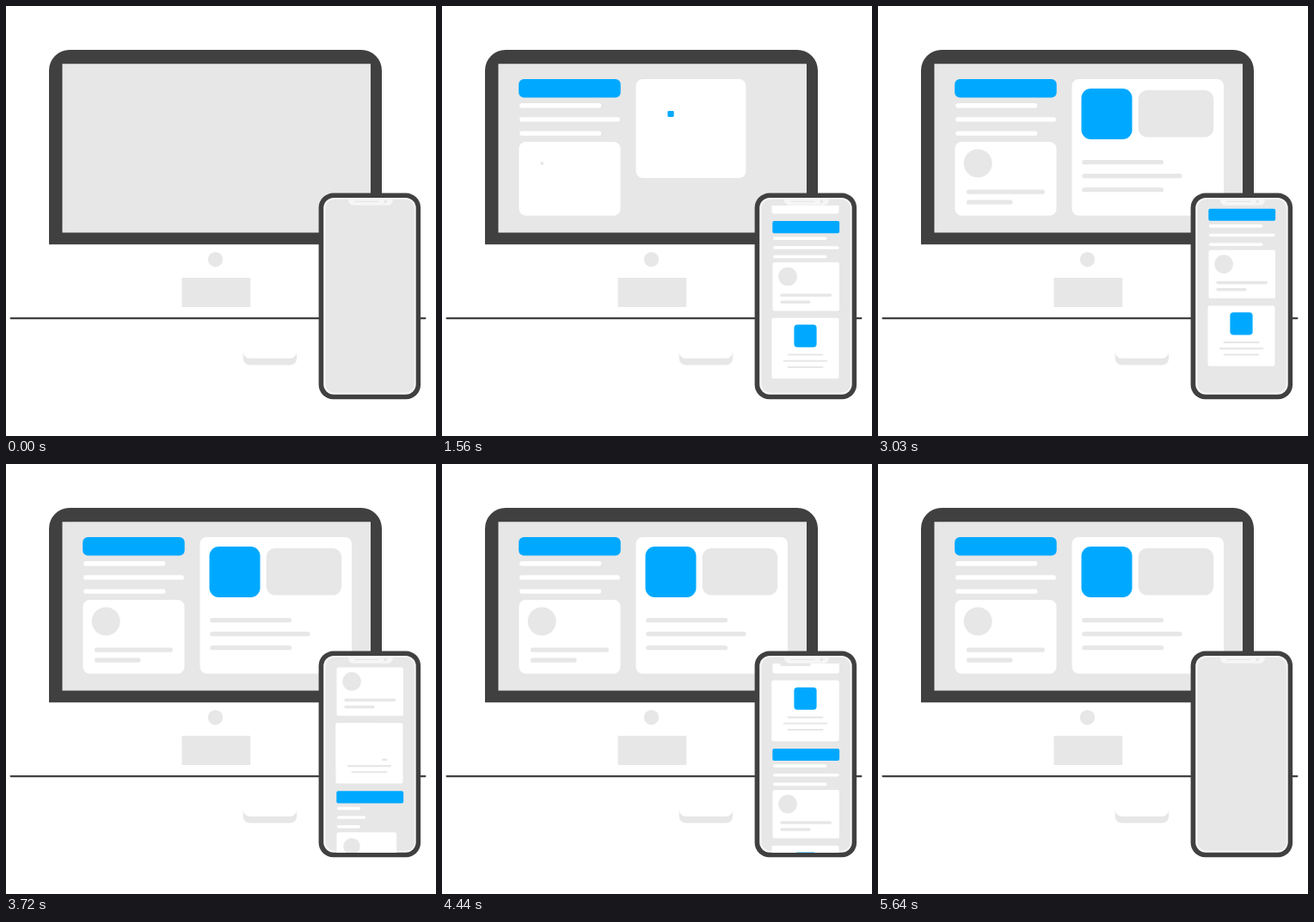
An HTML page with a canvas for the animation above (6330 ms loop, 500 by 500 pixels).

```html
<!DOCTYPE html>
<html lang="en">
<head>
<meta charset="utf-8">
<title>Desktop and phone wireframes</title>
<style>
html, body { margin: 0; width: 100%; height: 100%; overflow: hidden; background: #fff; }
canvas { display: block; width: 100vmin; height: 100vmin; }
</style>
</head>
<body>
<canvas id="stage" width="500" height="500"></canvas>
<script>
const ctx = document.getElementById('stage').getContext('2d');
const LOOP = 6330, STEP = 30, BUILD_START = 120;
const DARK = '#404040', GREY = '#e7e7e7', WHITE = '#fff', PALE = '#f6f6f6', BLUE = '#00a9ff';

// The phone feed repeats one group, scrolls steadily, then clears.
const SCROLL_START = 2820, SCROLL_END = 5640, SCROLL_SPEED = 0.0685;
const GROUP_HEIGHT = 191.8, GROUP_DELAY = 2990;
const PHONE_SCALE = 0.657;

// Returns the eased progress of the nth staggered part.
function sequence(t, stagger, duration) {
  return n => {
    const p = Math.min(1, Math.max(0, (t - BUILD_START - n * stagger) / duration));
    return p * p * (3 - 2 * p);
  };
}

function box(x, y, w, h, r, color) {
  if (w <= 0 || h <= 0) return;
  ctx.fillStyle = color;
  ctx.beginPath();
  ctx.roundRect(x, y, w, h, r);
  ctx.fill();
}

function disc(x, y, r, color) {
  box(x - r, y - r, 2 * r, 2 * r, r, color);
}

// Grows from the top left corner.
function card(p, x, y, w, h, r) {
  box(x, y, w * p, h * p, r, WHITE);
}

// Grows from the centre.
function pop(p, x, y, w, h, r, color) {
  box(x + w * (1 - p) / 2, y + h * (1 - p) / 2, w * p, h * p, r * p, color);
}

// Three lines, the outer two shorter; anchor 0 grows rightwards, 0.5 from the middle.
function paragraph(p, x, y, width, gap, thickness, color, anchor = 0) {
  for (let i = 0; i < 3; i++) {
    const w = width * p * (i === 1 ? 1 : 0.815);
    box(x - w * anchor, y + i * gap, w, thickness, thickness / 2, color);
  }
}

// Heading, paragraph and profile card; order gives the turn of each part.
function drawProfile(phase, order, x, y, scale, rounding) {
  const [heading, text, panel, photo, caption] = order.map(phase);
  ctx.save();
  ctx.translate(x, y);
  ctx.scale(scale, scale);
  box(0, 0, 118.5 * heading, 21.5, 6 * rounding, BLUE);
  paragraph(text, 1, 28, 116.7, 16.2, 5.4, WHITE);
  card(panel, 0.3, 73, 118, 85.8, 8 * rounding);
  pop(photo, 10.5, 81.5, 33, 33, 16.5, GREY);
  box(13.7, 128.4, 91 * caption, 5.3, 2.6, GREY);
  box(13.7, 140.5, 53.7 * caption, 5.3, 2.6, GREY);
  ctx.restore();
}

function drawMonitor() {
  box(50, 51, 387, 226.3, [24, 24, 0, 0], DARK);
  box(65.5, 67.2, 358.5, 196.3, 0, GREY);
  disc(243.5, 294.7, 8.7, GREY);
  box(204.5, 316, 79.7, 34, 0, GREY);
  box(4.5, 362, 484, 2.2, 1.1, DARK);
  box(275.7, 401, 62.4, 16.5, [0, 0, 8, 8], GREY);
  box(275.7, 398, 62.4, 11.8, [0, 0, 8, 8], WHITE);
}

function drawDesktopPage(t) {
  const phase = sequence(t, 192, 440);
  drawProfile(phase, [0, 2, 5, 7, 9], 89.2, 85, 1, 1);
  card(phase(6), 225.5, 85, 176.5, 158.8, 8);
  pop(phase(7), 236.5, 96, 59, 59, 11, BLUE);
  pop(phase(8), 302.7, 98, 87.5, 54.5, 10, GREY);
  paragraph(phase(10.3), 237.3, 179, 116.3, 16, 5.3, GREY);
}

function drawPhoneTile(phase, y) {
  card(phase(3.5), 383.5, y, 78, 70.4, 2);
  pop(phase(6.5), 409.4, y + 7.8, 26.2, 26.2, 4, BLUE);
  paragraph(phase(7), 422.5, y + 41.7, 51.5, 7.2, 2.1, GREY, 0.5);
}

function drawPhoneGroup(t, y) {
  const phase = sequence(t, 115, 330);
  drawProfile(phase, [0, 4, 3, 3, 5], 384.3, y, PHONE_SCALE, 0.5);
  drawPhoneTile(phase, y + 112.7);
  // End of the tile that precedes this group in the feed.
  drawPhoneTile(phase, y + 112.7 - GROUP_HEIGHT);
}

function drawPhone(t) {
  box(363.6, 217.6, 118.5, 239.6, 17, DARK);
  box(369.2, 223, 107.5, 228.8, 12, PALE);
  box(371.5, 225, 103.2, 224.8, 10, GREY);

  if (t < SCROLL_END) {
    const y = 250.1 - Math.max(0, t - SCROLL_START) * SCROLL_SPEED;
    ctx.save();
    ctx.beginPath();
    ctx.rect(371, 232, 104, 220);
    ctx.clip();
    drawPhoneGroup(t, y);
    drawPhoneGroup(t - GROUP_DELAY, y + GROUP_HEIGHT);
    ctx.restore();
  }

  box(398, 223.3, 51.8, 8.5, [1, 1, 6, 6], PALE);
  box(405, 226.7, 29, 1.4, 0.7, GREY);
  disc(441.3, 227.4, 1.9, GREY);
}

function frame() {
  const t = Math.floor((performance.now() - begin) % LOOP / STEP) * STEP;
  ctx.fillStyle = WHITE;
  ctx.fillRect(0, 0, 500, 500);
  drawMonitor();
  drawDesktopPage(t);
  drawPhone(t);
  requestAnimationFrame(frame);
}

const begin = performance.now();
frame();
</script>
</body>
</html>
```
